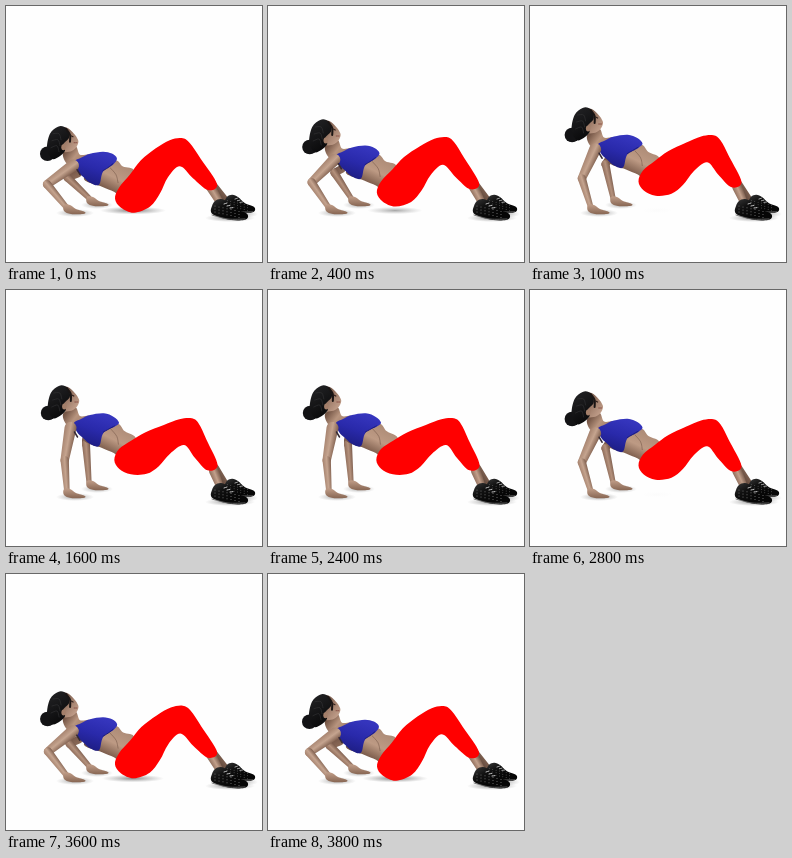
Write an HTML page with a canvas that moves like this. It is 256 by 256 pixels and loops after 4 s.

```html
<!DOCTYPE html>
<html lang="en">
<head>
<meta charset="utf-8">
<title>Reverse plank lift</title>
<style>
  html, body { margin: 0; width: 100%; height: 100%; overflow: hidden; background: #fefefe; }
  canvas { display: block; width: 100vw; height: 100vh; }
</style>
</head>
<body>
<canvas id="stage"></canvas>
<script>
const canvas = document.getElementById('stage');
const ctx = canvas.getContext('2d');
const STEP = 200, STEPS = 20;

const clamp = (v, lo = 0, hi = 1) => Math.max(lo, Math.min(hi, v));
const mix = (a, b, u) => a + (b - a) * u;

// Steady rise, hold, steady fall: 0 is lowered, 1 is raised.
const raiseAt = step => clamp((9 - Math.abs(step - 9.5)) / 6, -0.03, 1);

// The trunk rises as one; the lift fades towards the feet while the knees swing forward.
function lift([x, y], u) {
  const reach = Math.max(0, x - (y - 170) / 2 - 105) / 40;
  const swing = 0.2 * (181 - y) * clamp((x - 90) / 60);
  return [x + swing * u, y - 22 * u / (1 + reach * reach)];
}
const pose = (points, u) => points.map(p => lift(p, u));

function trace(p, closed = true) {
  const n = p.length;
  const at = i => closed ? p[(i + n) % n] : p[clamp(i, 0, n - 1)];
  ctx.beginPath();
  ctx.moveTo(...p[0]);
  for (let i = 0; i < (closed ? n : n - 1); i++) {
    const [a, b, c, d] = [at(i - 1), at(i), at(i + 1), at(i + 2)];
    ctx.bezierCurveTo(b[0] + (c[0] - a[0]) / 6, b[1] + (c[1] - a[1]) / 6,
      c[0] - (d[0] - b[0]) / 6, c[1] - (d[1] - b[1]) / 6, ...c);
  }
}

function blob(points, fill) {
  trace(points);
  ctx.fillStyle = fill;
  ctx.fill();
}

function line(points, color, width = 1) {
  trace(points, false);
  ctx.strokeStyle = color;
  ctx.lineWidth = width;
  ctx.lineCap = 'round';
  ctx.stroke();
}

function ramp(x0, y0, x1, y1, ...colors) {
  const g = ctx.createLinearGradient(x0, y0, x1, y1);
  colors.forEach((c, i) => g.addColorStop(i / (colors.length - 1), c));
  return g;
}

function oval(x, y, rx, ry, fill) {
  ctx.beginPath();
  ctx.ellipse(x, y, rx, ry, 0, 0, 7);
  ctx.fillStyle = fill;
  ctx.fill();
}

function shadow(x, y, rx, ry, alpha) {
  ctx.save();
  ctx.translate(x, y);
  ctx.scale(rx, ry);
  const g = ctx.createRadialGradient(0, 0, 0, 0, 0, 1);
  g.addColorStop(0, `rgba(70,70,70,${alpha})`);
  g.addColorStop(1, 'rgba(120,120,120,0)');
  oval(0, 0, 1, 1, g);
  ctx.restore();
}

// Tapered limb with rounded ends, shaded across its width.
function limb(x0, y0, r0, x1, y1, r1, ...tones) {
  const a = Math.atan2(y1 - y0, x1 - x0);
  const nx = -Math.sin(a) * r0, ny = Math.cos(a) * r0;
  ctx.beginPath();
  ctx.arc(x0, y0, r0, a + Math.PI / 2, a - Math.PI / 2);
  ctx.arc(x1, y1, r1, a - Math.PI / 2, a + Math.PI / 2);
  ctx.fillStyle = ramp(x0 + nx, y0 + ny, x0 - nx, y0 - ny, ...tones);
  ctx.fill();
}

function hand(x, y) {
  blob([[x - 3, y - 4], [x + 3, y - 4], [x + 9, y], [x + 18, y + 3], [x + 16, y + 5], [x + 4, y + 5], [x - 3, y + 2]],
    ramp(x, y - 4, x, y + 6, '#bd9a85', '#83624f'));
}

function farArm(u) {
  const x = mix(62, 80, u), y = mix(171, 154, u);
  limb(mix(72, 80, u), mix(167, 150, u), 4, x, y, 4, '#78594a', '#8a6957');
  limb(x, y, 4, 83, 192, 2.6, '#8d6b59', '#b4917c', '#78594a');
  hand(84, 195);
}

// The hand stays planted, so the elbow follows from the shoulder.
function nearArm(u) {
  const sx = mix(67, 64.5, u), sy = mix(159, 138, u), wx = 61, wy = 202;
  const upper = 32, fore = 31;
  const dx = wx - sx, dy = wy - sy, d = Math.min(Math.hypot(dx, dy), upper + fore - 0.5);
  const along = (upper ** 2 - fore ** 2 + d * d) / (2 * d);
  const out = Math.sqrt(upper ** 2 - along ** 2);
  const ex = sx + (dx * along - dy * out) / d, ey = sy + (dy * along + dx * out) / d;
  const skin = ['#a5826e', '#c5a48f', '#80604f'];
  limb(sx, sy, 6, ex, ey, 4.2, ...skin);
  limb(ex, ey, 4.2, wx, wy, 2.7, ...skin);
  hand(wx, 203);
  line([[sx + 4, sy + 4], [sx + 7, sy + 9]], '#352a35', 1.5);
}

function head(u) {
  ctx.save();
  ctx.translate(0.8 * u, -24 * u);
  oval(41.5, 147, 7.5, 7.3, '#131315');
  blob([[54, 123], [61, 121], [68, 127], [72, 133], [72, 137], [69, 142], [63, 145], [56, 143]],
    ramp(56, 126, 72, 138, '#6b5043', '#a17f6c', '#c09d89'));
  blob([[52, 120], [58, 120], [62, 124], [63, 131], [57, 138], [59, 144], [53, 150], [46, 152], [41, 142], [44, 127]],
    ramp(44, 124, 60, 148, '#202022', '#09090a'));
  oval(57.5, 140.5, 2.2, 3, '#a47f6a');
  line([[60, 122], [64, 128], [64, 135]], '#1a1514', 2);
  for (let i = 0; i < 3; i++) line([[47 - i, 127 + i * 7], [53 - i, 127 + i * 6], [55 - i, 133 + i * 6]], '#343437', 0.6);
  line([[65, 129], [67, 130]], '#30211d', 1.2);
  line([[68, 136], [71, 136]], '#8a5348');
  ctx.restore();
}

function shoe(x, y, size) {
  ctx.save();
  ctx.translate(x, y);
  ctx.scale(size, size);
  blob([[1, 8], [4, 3], [10, 1], [17, 4], [25, 11], [35, 15], [37, 19], [33, 22], [20, 22], [5, 18], [0, 14]],
    ramp(0, 0, 12, 22, '#3b3b3b', '#101010', '#060606'));
  for (let i = 0; i < 21; i++) {
    const col = i % 7, row = Math.floor(i / 7);
    oval(4 + col * 4, 8 + row * 3 + col * 0.9, 0.55, 0.5, '#777');
  }
  for (let i = 0; i < 3; i++) line([[13 + i * 3, 6 + i * 2], [16 + i * 3, 5 + i * 2.3]], '#d8d8d8', 0.9);
  line([[1, 17], [17, 21], [34, 21]], '#6b6b6b', 0.9);
  ctx.restore();
}

function feet(u) {
  limb(206 + 3 * u, 178, 4, 219, 193, 3.2, '#5f473b', '#7d5f4f');
  shoe(218, 188, 0.84);
  limb(205 + 3 * u, 181, 5, 214, 197, 3.6, '#8f6d5b', '#c2a08b', '#715445');
  shoe(205, 192, 1);
}

function waist(u) {
  const rise = -21 * u;
  blob(pose([[78, 171], [107, 154], [117, 160], [128, 165], [118, 190], [108, 185], [96, 180]], u),
    ramp(112, 156 + rise, 99, 183 + rise, '#ae8c77', '#bd9a84', '#755646'));
  line(pose([[104, 161], [110, 168], [112, 176]], u), 'rgba(100,72,58,.45)');
}

function pants(u) {
  blob(pose([
    [109, 192], [113, 181], [124, 168], [135, 154], [150, 142], [164, 134], [176, 132], [184, 137], [195, 153],
    [211, 178], [202, 184], [187, 172], [174, 160], [162, 171], [154, 187], [144, 200], [128, 206], [115, 201]
  ], u), '#f00');
}

function chest(u) {
  const rise = -22 * u;
  blob(pose([[57, 146], [69, 139], [74, 148], [83, 148], [74, 157], [62, 158]], u),
    ramp(60, 145 + rise, 76, 157 + rise, '#765747', '#b7947e', '#a27f6b'));
  blob(pose([
    [68, 155], [75, 151], [84, 147], [97, 145], [106, 147], [111, 152],
    [107, 158], [97, 165], [93, 178], [84, 176], [77, 170], [71, 164]
  ], u), ramp(94, 146 + rise, 84, 178 + rise, '#3535bd', '#2929aa', '#1d1d83'));
  line(pose([[97, 164], [102, 161], [107, 157]], u), '#1c1c7c');
}

function draw(u) {
  const near = clamp(1 - 1.3 * u);
  ctx.fillStyle = '#fefefe';
  ctx.fillRect(0, 0, 256, 256);
  shadow(69, 207, 19, 4, 0.5);
  shadow(91, 199, 16, 4, 0.45);
  shadow(127, 204.5, 16 + 17 * near, 3 + near, 0.7 * near);
  shadow(224, 212, 25, 4, 0.6);
  shadow(238, 208, 14, 4, 0.4);
  for (const part of [farArm, feet, waist, pants, chest, nearArm, head]) part(u);
}

function resize() {
  const scale = devicePixelRatio || 1;
  canvas.width = innerWidth * scale;
  canvas.height = innerHeight * scale;
  ctx.setTransform(canvas.width / 256, 0, 0, canvas.height / 256, 0, 0);
}

function tick() {
  draw(raiseAt(Math.floor(performance.now() / STEP) % STEPS));
  requestAnimationFrame(tick);
}

addEventListener('resize', resize);
resize();
tick();
</script>
</body>
</html>
```
